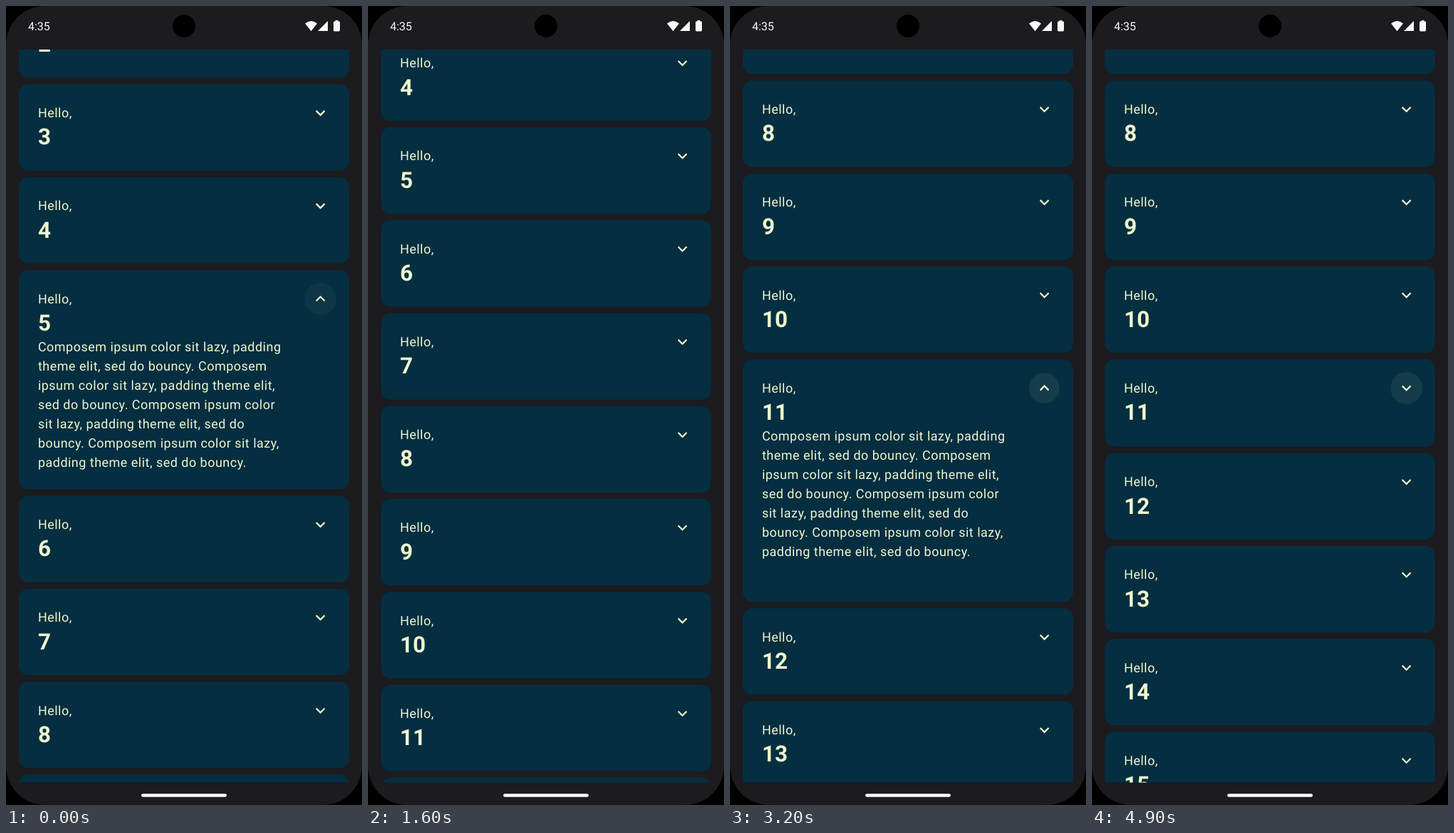
These frames come from a looping animation (500 by 1120 pixels, 5 s). An HTML page with a canvas:

```html
<!DOCTYPE html>
<html lang="en">
<head>
<meta charset="utf-8">
<title>Expanding list</title>
<style>
  html, body { margin: 0; width: 100%; height: 100%; overflow: hidden; background: #000; }
  canvas { display: block; width: 500px; height: 1120px; }
</style>
</head>
<body>
<canvas id="stage"></canvas>
<script>
const W = 500, H = 1120, LOOP = 5000, STEP = 100;
const DP = 1.1228;
const LEFT = 16 * DP, CARD_W = W - 32 * DP;
const CLOSED = 108 * DP, EXTRA = 168 * DP, PITCH = 116 * DP;
const LIST_TOP = 61, LIST_END = 1088.5, FIRST_TOP = -281.25;
const BG = '#1c1b1f', CARD = '#052e40', INK = '#eff7cf', WHITE = '#fafafa';
const FONT = 'Roboto, "Noto Sans", sans-serif';
const BODY = 16 * DP, TITLE = 28 * DP, TRACKING = 0.5;
const LINES = [
  'Composem ipsum color sit lazy, padding',
  'theme elit, sed do bouncy. Composem',
  'ipsum color sit lazy, padding theme elit,',
  'sed do bouncy. Composem ipsum color',
  'sit lazy, padding theme elit, sed do',
  'bouncy. Composem ipsum color sit lazy,',
  'padding theme elit, sed do bouncy.'
];
const TAPS = [
  { card: 5, at: -610, open: true },
  { card: 5, at: 662, open: false },
  { card: 11, at: 2930, open: true },
  { card: 11, at: 4462, open: false }
];
const MORE = new Path2D('M16.59 8.59L12 13.17 7.41 8.59 6 10l6 6 6-6z');
const LESS = new Path2D('M12 8l-6 6 1.41 1.41L12 10.83l4.59 4.58L18 14z');

const canvas = document.getElementById('stage');
const ctx = canvas.getContext('2d');
const ratio = window.devicePixelRatio || 1;
canvas.width = W * ratio;
canvas.height = H * ratio;
ctx.textRendering = 'geometricPrecision';

// Remaining distance of a spring, damping 0.5, stiffness 200
function spring(ms) {
  const t = ms / 1000, w = Math.sqrt(200), wd = w * Math.sqrt(0.75);
  return Math.exp(-w * t / 2) * (Math.cos(wd * t) + Math.sin(wd * t) / Math.sqrt(3));
}

// Finger drag, then a decelerating fling
function scrollAt(ms) {
  const drag = 308, total = 656.25;
  if (ms <= 1300) return 0;
  if (ms <= 1700) return drag * ((ms - 1300) / 400) ** 1.5;
  const left = Math.max(0, 1 - (ms - 1700) / 890);
  return total - (total - drag) * left ** 3;
}

function lastTap(card, ms) {
  return TAPS.filter(tap => tap.card === card && tap.at <= ms).pop();
}

function fillRound(x, y, w, h, r, color) {
  ctx.fillStyle = color;
  ctx.beginPath();
  ctx.roundRect(x, y, w, h, r);
  ctx.fill();
}

function fillCircle(x, y, r, color) {
  ctx.fillStyle = color;
  ctx.beginPath();
  ctx.arc(x, y, r, 0, Math.PI * 2);
  ctx.fill();
}

function text(str, x, y, size, weight = 400, spacing = 0, color = INK) {
  ctx.save();
  ctx.font = `${weight} ${size}px ${FONT}`;
  ctx.letterSpacing = spacing + 'px';
  ctx.fillStyle = color;
  ctx.translate(x, y);
  // An invisible skew keeps baselines from snapping to whole pixels
  ctx.transform(1, 1e-5, 0, 1, 0, 0);
  ctx.fillText(str, 0, 0);
  ctx.restore();
}

// Text centred in its line box
function lineText(str, mid, size, weight, spacing) {
  text(str, LEFT + 24 * DP, mid + size * 0.3415, size, weight, spacing);
}

function ripple(x, y, age) {
  if (age > 825) return;
  const grow = 1 - (1 - Math.min(1, age / 450)) ** 3;
  const fade = Math.min(1, age / 75, (825 - age) / 375);
  ctx.globalAlpha = 0.065 * fade;
  fillCircle(x, y, 20 * DP * (0.3 + 0.7 * grow), INK);
  ctx.globalAlpha = 1;
}

function drawCard(n, top, height, tap, ms) {
  const open = tap && tap.open;
  fillRound(LEFT, top, CARD_W, height, 12 * DP, CARD);

  ctx.save();
  ctx.beginPath();
  ctx.rect(LEFT, top + 12 * DP, CARD_W, height - 24 * DP);
  ctx.clip();
  lineText('Hello,', top + 36 * DP, BODY, 400, TRACKING);
  lineText(String(n), top + 66 * DP, TITLE, 700, 0);
  if (open) {
    LINES.forEach((line, i) => lineText(line, top + (96 + 24 * i) * DP, BODY, 400, TRACKING));
  }
  const cx = LEFT + CARD_W - 36 * DP, cy = top + 36 * DP;
  if (tap) ripple(cx, cy, ms - tap.at);
  ctx.translate(cx - 12 * DP, cy - 12 * DP);
  ctx.scale(DP, DP);
  ctx.fillStyle = INK;
  ctx.fill(open ? LESS : MORE);
  ctx.restore();
}

function drawList(ms) {
  ctx.save();
  ctx.beginPath();
  ctx.rect(0, LIST_TOP, W, LIST_END - LIST_TOP);
  ctx.clip();
  let top = FIRST_TOP - scrollAt(ms);
  for (let n = 0; top < LIST_END; n++) {
    const tap = lastTap(n, ms);
    let extra = 0;
    if (tap) {
      const rest = spring(ms - tap.at);
      extra = EXTRA * (tap.open ? 1 - rest : rest);
    }
    if (top + CLOSED + extra > LIST_TOP) drawCard(n, top, CLOSED + extra, tap, ms);
    top += PITCH + extra;
  }
  ctx.restore();
}

function drawBars() {
  fillCircle(250, 28, 16, '#000');
  text('4:35', 31, 34, 16, 400, 0, WHITE);

  ctx.fillStyle = WHITE;
  ctx.beginPath();
  ctx.moveTo(428.5, 35.3);
  ctx.lineTo(420, 24.6);
  ctx.quadraticCurveTo(428.5, 17.6, 437, 24.6);
  ctx.closePath();
  ctx.fill();

  ctx.beginPath();
  ctx.moveTo(438, 35);
  ctx.lineTo(452, 35);
  ctx.lineTo(452, 21);
  ctx.closePath();
  ctx.fill();

  fillRound(460, 21.6, 9, 13.8, 1.4, WHITE);
  ctx.fillRect(462.6, 20, 3.8, 2.5);
  fillRound(190, 1104.2, 120, 4.6, 2.3, WHITE);
}

function draw(ms) {
  ctx.setTransform(ratio, 0, 0, ratio, 0, 0);
  ctx.fillStyle = '#000';
  ctx.fillRect(0, 0, W, H);
  fillRound(0, 0, W, H, 55, BG);
  drawList(ms);
  drawBars();
}

const start = performance.now();
function tick() {
  const ms = Math.max(0, performance.now() - start) % LOOP;
  draw(Math.floor(ms / STEP) * STEP);
  requestAnimationFrame(tick);
}
tick();
</script>
</body>
</html>
```
